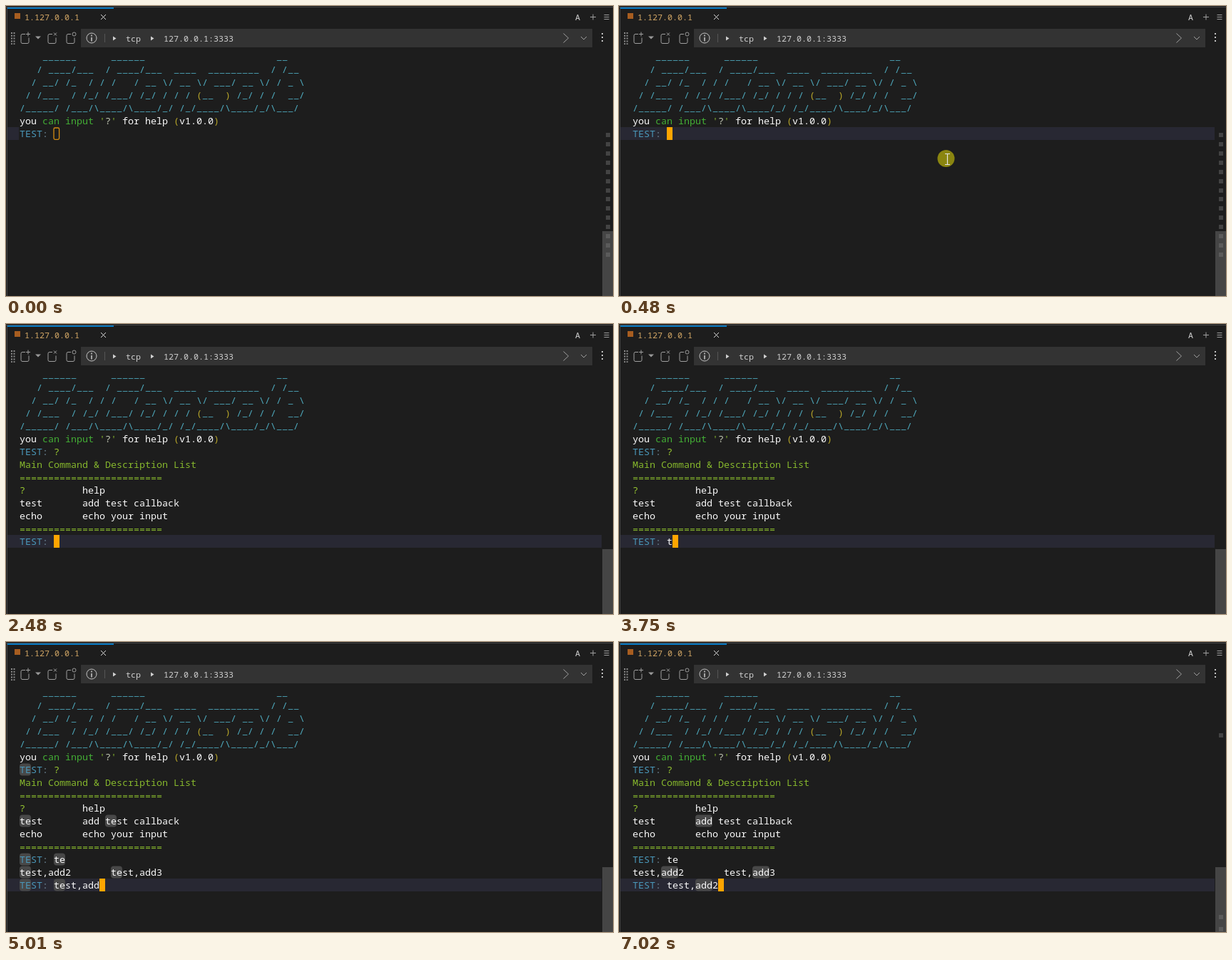
Animation, 851 px wide and 407 px high, one loop 8000 ms. Source, as an HTML page:

```html
<!DOCTYPE html>
<html lang="en">
<head>
<meta charset="utf-8">
<title>Terminal session</title>
<style>
html, body { margin: 0; width: 100%; height: 100%; overflow: hidden; background: #1d1d1d; }
svg { display: block; width: 851px; height: 407px; }
text { font: 13.333px "Noto Sans Mono", "DejaVu Sans Mono", monospace; white-space: pre; fill: #fafafa; }
.ui text { font-size: 11.667px; fill: #d0d0d0; }
.line { fill: none; stroke: #a0a0a0; stroke-width: 1; }
.art { fill: #4ea9bd; }
.under { fill: #4ea9bd; font-size: 11px; letter-spacing: 1.4px; }
.blue { fill: #4a98ba; }
.dim { fill: #70899a; }
.green { fill: #43ae35; }
.lime { fill: #86b72d; }
.bright { fill: #9acb32; }
.gold { fill: #b5a429; }
.grey { fill: #c6ccb8; }
</style>
</head>
<body>
<svg viewBox="0 0 851 407">
  <rect width="851" height="407" fill="#1d1d1d"/>
  <g class="ui">
    <path d="M0 1.5H851M1.5 1V407" stroke="#454545" fill="none"/>
    <rect x="2" y="2" width="149" height="2" fill="#087bc4"/>
    <rect x="12" y="10" width="8" height="8" fill="#a75d20"/>
    <text x="26" y="20" style="fill:#d4a866">1.127.0.0.1</text>
    <path class="line" d="M133 12l7 7m0-7l-7 7" style="stroke:#ddd"/>
    <text x="798" y="20">A</text>
    <path class="line" d="M819 15.5h8m-4-4v8M838.5 12.5h7m-7 3h7m-7 3h7"/>
    <path d="M8 37v17M11.5 37v17" stroke="#8c8c8c" stroke-width="2" stroke-dasharray="2 1.8"/>
    <g class="line">
      <path id="page" d="M27 39.5h-4q-2 0-2 2v9q0 2 2 2h7q2 0 2-2v-6"/>
      <use href="#page" x="38"/>
      <use href="#page" x="64"/>
      <path d="M28 39.5h6m-3-3v6M67 37.5l4 4m0-4l-4 4"/>
      <circle cx="95.5" cy="39.5" r="2.5"/>
    </g>
    <path d="M41 42.5h8l-4 4z" fill="#999"/>
    <rect x="105" y="32" width="717" height="26" fill="#333"/>
    <circle class="line" cx="120" cy="45" r="7" style="stroke:#c4c4c4"/>
    <path d="M120 40.5v2M120 44v5.5" stroke="#ccc" stroke-width="1.5"/>
    <path d="M138.5 39v12" stroke="#555"/>
    <path d="M150 42.5v6l4.5-3zM203 42.5v6l4.5-3z" fill="#d0d0d0"/>
    <text x="168" y="50">tcp</text>
    <text x="221" y="50">127.0.0.1:3333</text>
    <path class="line" d="M781.5 38.5l7 6.5-7 6.5M806 43l4 4 4-4"/>
    <path d="M835 38h2v2h-2zm0 5h2v2h-2zm0 5h2v2h-2z" fill="#c4c4c4"/>
    <rect x="836" y="316" width="15" height="91" fill="#454545"/>
  </g>
  <rect id="band" y="170" height="18" x="2" fill="#282833"/>
  <g id="marks"></g>
  <g id="rows"></g>
  <rect id="box" x="67" y="171" width="7.6" height="16.4" rx="1.8" fill="none" stroke="#d58c12" stroke-width="1.3"/>
  <rect id="caret" width="8" height="18" fill="#ffa500"/>
  <g id="mouse">
    <circle id="press" cx="-2" cy="-1" r="12" fill="#8a8510"/>
    <path d="M-3.5 -7.5h3l.5.5.5-.5h3M0 -7V7M-3.5 7.5h3l.5-.5.5.5h3" fill="none" stroke="#e4e4e4" stroke-width="1.2"/>
  </g>
</svg>
<script>
const LOOP = 8000, CELL = 8, ROW = 18, LEFT = 19, TOP = 62;
const FOCUS = 410, HELP = 2480, MATCH = 4880, TAB = 5010, RESELECT = 6010;
const $ = id => document.getElementById(id);
const colX = c => LEFT + c * CELL;
const rowY = r => TOP + r * ROW;
const timed = [];

function add(parent, tag, attrs, from = 0, to = LOOP) {
  const el = document.createElementNS("http://www.w3.org/2000/svg", tag);
  for (const k in attrs) el.setAttribute(k, attrs[k]);
  parent.append(el);
  timed.push({ el, from, to });
  return el;
}
const show = (el, on) => { el.style.display = on ? "" : "none"; };

function put(row, col, str, cls = "", from = 0, dx = 0, dy = 0) {
  add($("rows"), "text", { x: colX(col) + dx, y: rowY(row) + 14 + dy, class: cls }, from).textContent = str;
}
function match(row, col, len, from, to) {
  add($("marks"), "rect", {
    x: colX(col), y: rowY(row) + .5, width: len * CELL, height: 17, rx: 4, fill: "#484848"
  }, from, to);
}
function tick(y, from, to) {
  add($("marks"), "rect", { x: 841, y: y - 3, width: 6, height: 6, fill: y > 316 ? "#5b5b5b" : "#434343" }, from, to);
}
function prompt(row, from) {
  put(row, 0, "TEST", "blue", from);
  put(row, 4, ":", "dim", from);
}
const rule = row => put(row, 0, "=".repeat(25), "lime", HELP, 0, 1);

const banner = String.raw`
    ______      ______                       __
   / ____/___  / ____/___  ____  _________  / /__
  / __/ /_  / / /   / __ \/ __ \/ ___/ __ \/ / _ \
 / /___  / /_/ /___/ /_/ / / / (__  ) /_/ / /  __/
/_____/ /___/\____/\____/_/ /_/____/\____/_/\___/`.slice(1).split("\n");
// Underscores sit higher and apart, so each kind of glyph gets its own layer.
banner.forEach((line, r) => {
  put(r, 0, line.replace(/[^/\\]/g, " "), "art");
  put(r, 0, line.replace(/[^_]/g, " "), "under", 0, .7, -1);
  put(r, 0, line.replace(/[^()]/g, " "), "gold");
});

put(5, 0, "you");
put(5, 4, "can input", "green");
put(5, 14, "'", "lime");
put(5, 15, "?", "grey");
put(5, 16, "'", "lime");
put(5, 18, "for help");
put(5, 27, "(", "gold");
put(5, 28, "v1.0.0");
put(5, 34, ")", "gold");
prompt(6, 0);
put(6, 6, "?", "bright", 1550);

put(7, 0, "Main Command & Description List", "lime", HELP);
rule(8);
put(9, 0, "?", "bright", HELP);
["help", "add test callback", "echo your input"].forEach((s, i) => put(9 + i, 11, s, "", HELP));
put(10, 0, "test", "", HELP);
put(11, 0, "echo", "", HELP);
rule(12);
prompt(13, HELP);
put(13, 6, "t", "", 3750);
put(13, 7, "e", "", 3820);
put(14, 0, "test,add2       test,add3", "", TAB);
prompt(15, TAB);
put(15, 6, "test,add", "", TAB);
put(15, 14, "2", "", 7020);

for (const [r, c] of [[6, 0], [10, 0], [10, 15], [13, 0], [13, 6]]) match(r, c, 2, MATCH, RESELECT);
for (const [r, c] of [[14, 0], [14, 16], [15, 0], [15, 6]]) match(r, c, 2, TAB, RESELECT);
for (const [r, c] of [[10, 11], [14, 5], [14, 21], [15, 11]]) match(r, c, 3, RESELECT);

const TICK_GAP = 12.92;
for (let i = 0; i < 14; i++) tick(Math.round(181 + i * TICK_GAP), 0, 1010);
for (let i = 0; i < 24; i++) tick(Math.round(109 + i * TICK_GAP), 5280, 6290);
for (const y of [131, 386, 403]) tick(y, 6290);

// time, row, column
const caretAt = [[0, 6, 6], [1550, 6, 7], [HELP, 13, 6], [3750, 13, 7], [3820, 13, 8], [TAB, 15, 14], [7020, 15, 15]];

function render(t) {
  for (const { el, from, to } of timed) show(el, t >= from && t < to);

  const focused = t >= FOCUS;
  const [, row, col] = caretAt.findLast(c => t >= c[0]);
  $("caret").setAttribute("x", colX(col));
  $("caret").setAttribute("y", rowY(row));
  $("band").setAttribute("y", rowY(row));
  $("band").setAttribute("width", focused ? 833 : 16);
  show($("caret"), focused);
  show($("box"), !focused);

  const step = Math.min(1, Math.max(0, Math.floor((t - 70) / 68) / 5));
  const rest = (1 - step) ** 2;
  $("mouse").setAttribute("transform", `translate(${460.5 + 30 * rest} ${215 + 174 * rest})`);
  show($("mouse"), t >= 70 && t < 1550);
  show($("press"), focused && t < 550);
}

const start = performance.now();
function frame() {
  render((performance.now() - start) % LOOP);
  requestAnimationFrame(frame);
}
frame();
</script>
</body>
</html>
```
